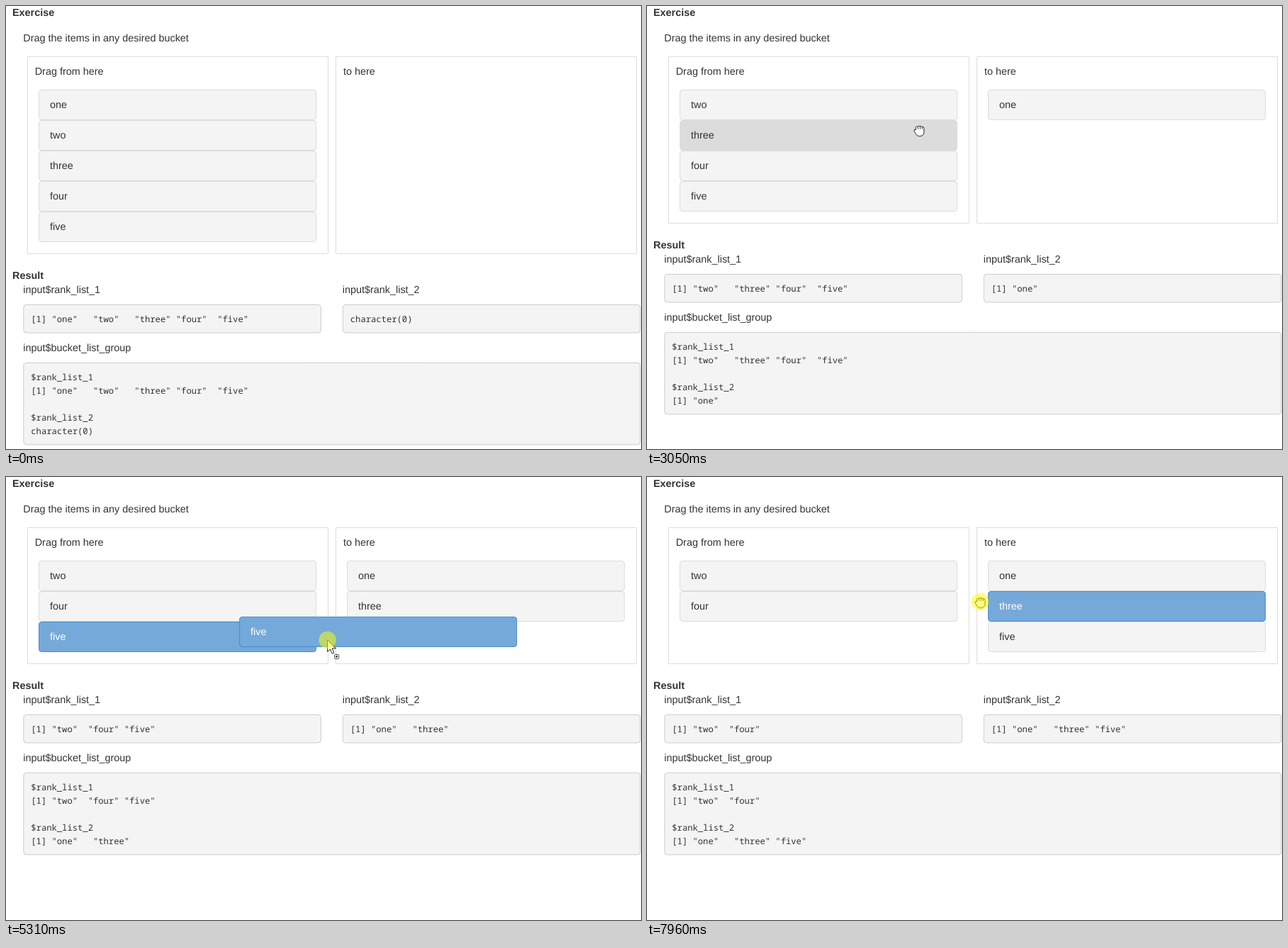
Recreate the animation shown at these times as an HTML page with a canvas. Size 896 by 625 pixels, loop 8000 ms.

```html
<!DOCTYPE html>
<html lang="en">
<head>
<meta charset="utf-8">
<title>Bucket list</title>
<style>
html, body { margin: 0; width: 100%; height: 100%; overflow: hidden; background: #fff; }
canvas { display: block; }
</style>
</head>
<body>
<canvas id="stage" width="896" height="625"></canvas>
<script>
const ctx = document.getElementById("stage").getContext("2d");
const LOOP = 8000, STEP = 80, ROW = 43, SLIDE = 150;
const SANS = '14.4px "Liberation Sans", Arial, sans-serif';
const MONO = '12.18px "Noto Sans Mono", monospace';
const INK = "#333", BLUE = "#75a9da", BLUE_EDGE = "#468dcd";
const names = ["one", "two", "three", "four", "five"];

const HAND = new Path2D("M-6.6 .8Q-8-1.5-5.8-1.7L-4.6-1V-5Q-3.2-7-1.5-5.6Q0-7.6 1.5-5.9Q3.2-7.2 4.4-5.3Q6.8-5.9 7-3.3V2Q7 7.8.5 7.8Q-4 7.8-6.6.8ZM-1.5-5.6V-2.2M1.5-5.9V-2.2M4.4-5.3V-2.2");
const ARROW = new Path2D("M0 0V16.5L3.8 13L6.6 19.2L9.3 18L6.5 12H11.7Z");

// A pointer gesture runs from start to end and comes to rest at (x, y).
const gesture = (start, end, x, y, power = 3.6) => ({ start, end, x, y, power });
const gestures = [
  gesture(0, 0, 190, 25),
  gesture(1390, 1890, 125, 136),
  gesture(2110, 2720, 638, 159),
  gesture(2900, 3380, 110, 194),
  gesture(3670, 4070, 552, 210),
  gesture(4210, 4850, 170.5, 237),
  gesture(5090, 5550, 531, 228),
  gesture(5610, 5890, 574.5, 235, 1),
  gesture(6170, 6170, 574.5, 235),
  gesture(6320, 6550, 431, 248),
  gesture(6710, 6870, 560, 232),
  gesture(7020, 7250, 518, 169),
  gesture(7810, 7810, 518, 169),
  gesture(7960, 7960, 470, 177)
];

// Button down, item changes bucket, button up; the ghost and the output follow a little later.
const drag = (name, down, shift = Infinity, drop = Infinity) =>
  ({ name, down, lift: shift < Infinity ? down + 70 : shift, shift, drop, commit: drop + STEP });
const drags = [
  drag("one", 2110, 2605, 2900),
  drag("three", 3670, 3855, 4210),
  drag("five", 5090, 5645, 6170),
  drag("three", 7810)
];

const gestureAt = t => gestures.findLastIndex(g => g.start <= t);

// The screen repaints only during gestures, once per step.
function repaintTime(t) {
  const { start, end } = gestures[gestureAt(t)];
  return t >= end ? end : start + Math.floor((t - start) / STEP) * STEP;
}

function pointerAt(t) {
  const i = gestureAt(t), to = gestures[i], from = gestures[i - 1] || to;
  const p = t >= to.end ? 1 : (t - to.start) / (to.end - to.start);
  const left = (1 - p) ** to.power;
  return [to.x + (from.x - to.x) * left, to.y + (from.y - to.y) * left];
}

// Contents of both buckets after every drag whose given phase has passed.
function bucketsAt(t, phase) {
  const moved = drags.filter(d => t >= d[phase]).map(d => d.name);
  return [names.filter(n => !moved.includes(n)), moved];
}

function slotAt(t, name) {
  const buckets = bucketsAt(t, "shift");
  const side = buckets[0].includes(name) ? 0 : 1;
  return [46 + 435 * side, 118 + ROW * buckets[side].indexOf(name)];
}

function itemPos(t, name) {
  const end = slotAt(t, name);
  const moving = drags.find(d => t >= d.shift && t < d.shift + SLIDE);
  if (!moving) return end;
  const start = slotAt(moving.shift - 1, name);
  const left = (1 - (t - moving.shift) / SLIDE) ** 2;
  return end.map((v, i) => v + (start[i] - v) * left);
}

function text(s, x, y, font = SANS, color = INK) {
  ctx.font = font;
  ctx.textRendering = "geometricPrecision";
  ctx.fillStyle = color;
  ctx.fillText(s, x, y);
}

function box(x, y, w, h, fill, edge, radius = 0) {
  ctx.beginPath();
  ctx.roundRect(x + .5, y + .5, w, h, radius);
  ctx.fillStyle = fill;
  ctx.fill();
  ctx.strokeStyle = edge;
  ctx.lineWidth = 1;
  ctx.stroke();
}

const looks = {
  plain: ["#f4f4f4", "#dcdcdc", INK],
  hover: ["#dcdcdc", "#dcdcdc", INK],
  active: [BLUE, BLUE_EDGE, "#fff"]
};

function item(x, y, label, look) {
  const [fill, edge, color] = looks[look];
  box(x, y, 391, 42, fill, edge, 3.5);
  text(label, x + 16, y + 26, SANS, color);
}

function printed(list) {
  if (!list.length) return "character(0)";
  const quoted = list.map(n => `"${n}"`);
  const width = Math.max(...quoted.map(q => q.length));
  return "[1] " + quoted.map(q => q.padEnd(width)).join(" ");
}

function results(top, lists) {
  const [first, second] = lists.map(printed);
  const block = (x, y, w, h) => box(x, y, w, h, "#f4f4f4", "#ccc", 4);
  text("Result", 9, top + 36, "bold " + SANS);
  [first, second].forEach((line, i) => {
    const x = 24.3 + 450.5 * i;
    text("input$rank_list_" + (i + 1), x, top + 56);
    block(x, top + 71.9, 419.6, 39.6);
    text(line, x + 11, top + 96.5, MONO);
  });
  text("input$bucket_list_group", 24.3, top + 138);
  block(24.3, top + 153.9, 870.1, 115.5);
  ["$rank_list_1", first, "", "$rank_list_2", second]
    .forEach((line, i) => text(line, 35.3, top + 178.5 + 19 * i, MONO));
}

function pointer(x, y, dragging, hand, pressed) {
  const shape = hand ? HAND : ARROW;
  ctx.save();
  ctx.translate(x, y);
  ctx.fillStyle = "#fff";
  ctx.strokeStyle = "#222";
  ctx.lineWidth = 1;
  ctx.fill(shape);
  ctx.stroke(shape);
  if (dragging) {
    box(9.5, 20, 6, 6, "#fff", "#444", 1);
    ctx.fillStyle = "#333";
    ctx.fillRect(11.3, 22.6, 3, 1.6);
    ctx.fillRect(12.6, 21.8, 1, 3.2);
  }
  if (pressed) {
    ctx.beginPath();
    ctx.arc(0, hand ? -1 : 0, 12.2, 0, 7);
    ctx.fillStyle = "rgba(255,255,0,.52)";
    ctx.fill();
  }
  ctx.restore();
}

function draw(t) {
  ctx.fillStyle = "#fff";
  ctx.fillRect(0, 0, 896, 625);

  const longest = Math.max(...bucketsAt(t, "shift").map(b => b.length));
  const height = 63 + ROW * longest, bottom = 71 + height;
  const current = drags.find(d => t >= d.down && t < d.commit);
  const lifted = current && t >= current.lift && t < current.drop;
  const shown = t > 0;
  const [px, py] = pointerAt(t);

  text("Exercise", 9, 14, "bold " + SANS);
  text("Drag the items in any desired bucket", 24.3, 50);
  box(30, 71, 424, height, "#fff", "#ddd");
  box(465, 71, 424, height, "#fff", "#ddd");
  text("Drag from here", 40.7, 97);
  text("to here", 476, 97);

  const order = names.filter(n => n !== current?.name);
  if (current) order.push(current.name);
  for (const name of order) {
    const [x, y] = itemPos(t, name);
    const over = shown && !current && px > x && px < x + 392 && py > y && py < y + ROW;
    item(x, y, name, name === current?.name ? "active" : over ? "hover" : "plain");
  }

  results(bottom, bucketsAt(t, "commit"));

  if (!shown) return;
  if (lifted) {
    const [gx, gy] = pointerAt(current.down);
    const [sx, sy] = slotAt(current.down, current.name);
    item(sx + px - gx, sy + py - gy, current.name, "active");
  }
  pointer(px, py, lifted, !lifted && py > 110 && py < bottom, current && t < current.drop);
}

function frame() {
  draw(repaintTime(performance.now() % LOOP));
  requestAnimationFrame(frame);
}
frame();
</script>
</body>
</html>
```
